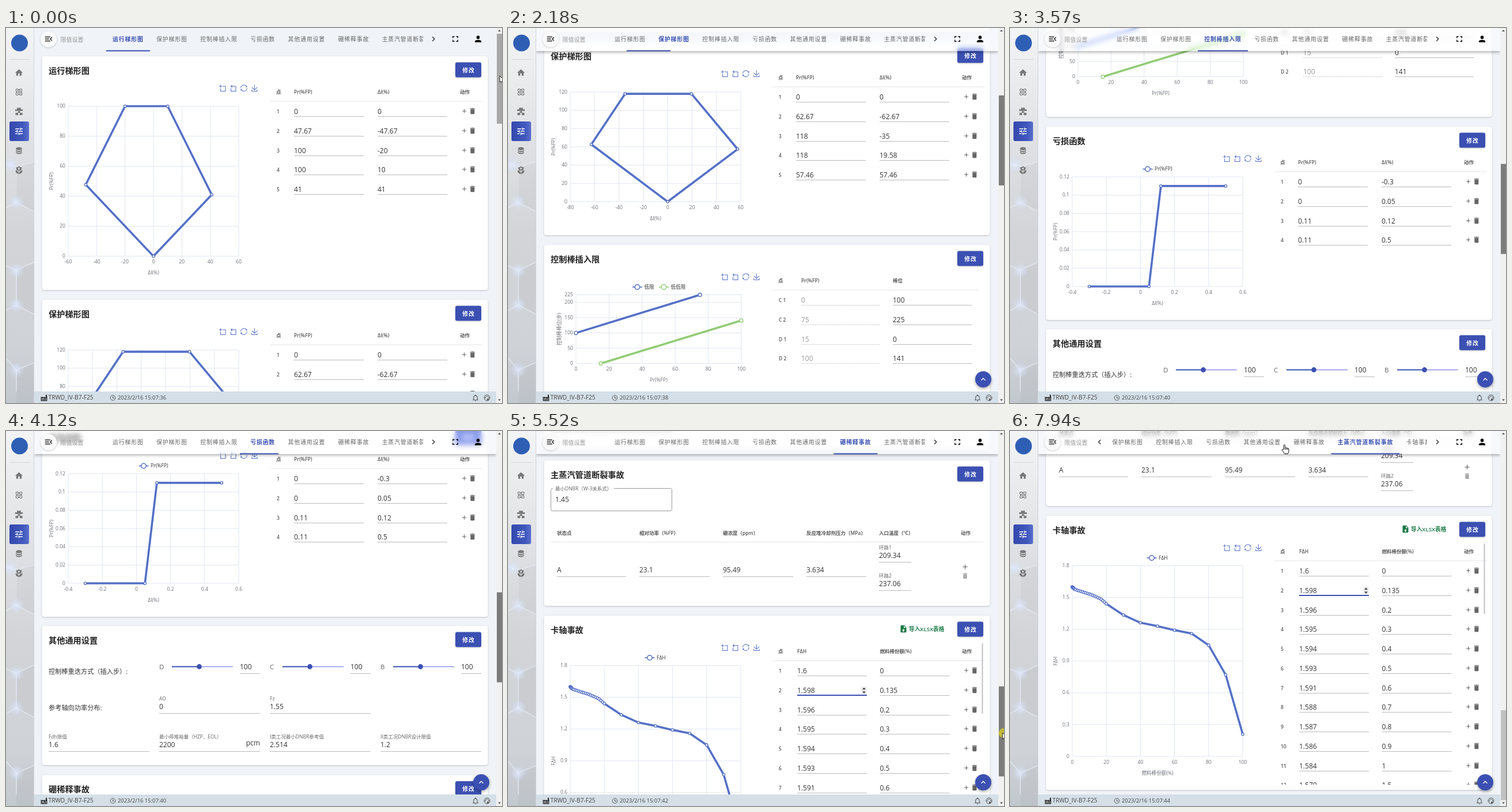
Write an HTML page that moves like this. It is 861 by 650 pixels and loops after 7.99 s.

```html
<!DOCTYPE html>
<html lang="zh-CN">
<head>
<meta charset="utf-8">
<style>
html, body { margin: 0; width: 100%; height: 100%; overflow: hidden; background: #f0f3f8; }
body { position: relative; font-family: 'Open Sans', 'Noto Sans CJK SC', 'Noto Sans CJK', sans-serif; }
svg, #bar { position: absolute; left: 0; top: 0; }
#bar { left: 49px; width: 802px; height: 40px; }
#bar.up { background: rgba(255,255,255,.42); backdrop-filter: blur(5px) saturate(1.5); box-shadow: 0 2px 5px rgba(0,0,0,.32); }
text { white-space: pre; }
.card { filter: drop-shadow(0 1px 1.5px rgba(0,0,0,.2)); }
.float { filter: drop-shadow(0 2px 2.5px rgba(0,0,0,.35)); }
</style>
</head>
<body>
<svg id="page" width="861" height="2660"></svg>
<div id="bar"></div>
<svg id="chrome" width="861" height="650"></svg>
<script>
const BLUE = '#3b50b2', LINE = '#5470c6', GREEN = '#91cc75', GREY = '#6e7079', RULE = '#b9bbbf';
const $ = id => document.getElementById(id);

const icons = {
  home: 'M10 20v-6h4v6h5v-8h3L12 3 2 12h3v8z',
  data: 'M12 3C7.6 3 4 4.8 4 7s3.6 4 8 4 8-1.8 8-4-3.6-4-8-4M4 9v3c0 2.2 3.6 4 8 4s8-1.8 8-4V9c0 2.2-3.6 4-8 4s-8-1.8-8-4m0 5v3c0 2.2 3.6 4 8 4s8-1.8 8-4v-3c0 2.2-3.6 4-8 4s-8-1.8-8-4z',
  tune: 'M3 17v2h6v-2H3M3 5v2h10V5H3m10 16v-2h8v-2h-8v-2h-2v6h2M7 9v2H3v2h4v2h2V9H7m14 4v-2H11v2h10m-6-4h2V7h4V5h-4V3h-2v6z',
  desks: 'M7 2h10v4h5v4H2V6h5zM9 11h6v4H9zM3 15h7v6H3zM14 15h7v6h-7z',
  flower: 'M12 2l3 3h4v4l-2 4-5 1-5-1-2-4V5h4zM12 6a2.5 2.5 0 1 0 0 5 2.5 2.5 0 0 0 0-5M3 13c5 0 8 3 9 8 1-5 4-8 9-8 0 6-4 9-9 9s-9-3-9-9z',
  user: 'M12 4a4 4 0 1 1 0 8 4 4 0 0 1 0-8m0 10c4.4 0 8 1.8 8 4v2H4v-2c0-2.2 3.6-4 8-4z',
  full: 'M5 5h5v2H7v3H5V5m9 0h5v5h-2V7h-3V5m3 9h2v5h-5v-2h3v-3m-7 3v2H5v-5h2v3h3z',
  bin: 'M19 4h-3.5l-1-1h-5l-1 1H5v2h14M6 19a2 2 0 0 0 2 2h8a2 2 0 0 0 2-2V7H6z',
  plus: 'M19 13h-6v6h-2v-6H5v-2h6V5h2v6h6z',
  bell: 'M10 21h4c0 1.1-.9 2-2 2s-2-.9-2-2m11-2v1H3v-1l2-2v-6c0-3.1 2-5.8 5-6.7V4a2 2 0 0 1 4 0v.3c3 .9 5 3.6 5 6.7v6l2 2m-4-8a5 5 0 0 0-10 0v7h10z',
  menu: 'M21 15.6L19.6 17l-5-5 5-5L21 8.4 17.4 12zM3 6h13v2H3V6m0 7v-2h10v2H3m0 5v-2h13v2H3z',
  up: 'M7.4 15.4L12 10.8l4.6 4.6L18 14l-6-6-6 6z',
  right: 'M8.6 16.6L13.2 12 8.6 7.4 10 6l6 6-6 6z',
  left: 'M15.4 16.6L10.8 12l4.6-4.6L14 6l-6 6 6 6z',
  file: 'M14 2H6a2 2 0 0 0-2 2v16a2 2 0 0 0 2 2h12a2 2 0 0 0 2-2V8l-6-6m-1 7V3.5L18.5 9H13m-1 3l4 4h-2.5v4h-3v-4H8z',
  plant: 'M4 18v2h4v-2H4m0-4v2h10v-2H4m6 4v2h4v-2h-4m6-4v2h4v-2h-4m0 4v2h4v-2h-4M2 22V8l5 4V8l5 4V8l5 4 1-10h3l1 10v10z'
};
const tools = [
  'M0,13.5h26.9M13.5,26.9V0M32.1,13.5H58V58H13.5V32.1',
  'M22,1.4L9.9,13.5l12.3,12.3M10.3,13.5H54.9v44.6H10.3v-26',
  'M47,18.9h9.8V8.7M56.3,20.1C52.1,9,40.5,.6,26.8,2.1C12.6,3.7,1.6,16.2,2.1,30.6M13,41.1H3.1v10.2M3.7,39.9c4.2,11.1,15.8,19.5,29.5,18c14.2-1.6,25.2-14.1,24.7-28.5',
  'M4.7,22.9L29.3,45.5L54.7,23.4M4.6,43.6V58H53.8V43.6M29.2,45.1V0'
];

// Drawing helpers; text is centred vertically on y
const text = (x, y, s, size = 12, fill = '#333', more = '') =>
  `<text x="${x}" y="${y + size * .36}" font-size="${size}" fill="${fill}" ${more}>${s}</text>`;
const bold = 'font-weight="600"', mid = 'text-anchor="middle"';
const small = (x, y, s) => text(x, y, s, 8.5, '#666');
const head = (x, y, s) => text(x, y, s, 8.5, '#555', bold);
const line = (x1, y1, x2, y2, c = RULE, w = 1, more = '') =>
  `<path d="M${x1} ${y1}L${x2} ${y2}" stroke="${c}" stroke-width="${w}" ${more}/>`;
const rect = (x, y, w, h, fill, more = '') =>
  `<rect x="${x}" y="${y}" width="${w}" height="${h}" fill="${fill}" ${more}/>`;
const dot = (x, y, r, fill, more = '') => `<circle cx="${x}" cy="${y}" r="${r}" fill="${fill}" ${more}/>`;
const icon = (k, x, y, size, fill = '#666') =>
  `<path fill-rule="evenodd" fill="${fill}" d="${icons[k]}" transform="translate(${x - size / 2} ${y - size / 2}) scale(${size / 24})"/>`;
const range = (a, b, step) =>
  Array.from({ length: Math.round((b - a) / step) + 1 }, (_, i) => +(a + i * step).toFixed(2));
const mix = (a, b, p) => a + (b - a) * p;
const clamp = v => Math.max(0, Math.min(1, v));

function track(keys, t, col = 1) {
  const i = keys.findIndex(k => k[0] > t);
  if (i < 0) return keys[keys.length - 1][col];
  if (!i) return keys[0][col];
  const a = keys[i - 1], b = keys[i];
  return mix(a[col], b[col], (t - a[0]) / (b[0] - a[0]));
}

function chart({ x0 = 108, x1 = 404, y0 = 87, y1 = 277, xs, ys, xn, yn, series, legend = [], r = 2.2 }) {
  const xa = xs[0], xb = xs[xs.length - 1], ya = ys[0], yb = ys[ys.length - 1];
  const X = v => mix(x0, x1, (v - xa) / (xb - xa)), Y = v => mix(y1, y0, (v - ya) / (yb - ya));
  let s = '';
  for (const v of xs) s += line(X(v), y0, X(v), y1, '#e0e6f1') + text(X(v), y1 + 9.5, v, 8.6, GREY, mid);
  for (const v of ys) s += line(x0, Y(v), x1, Y(v), '#e0e6f1') + text(x0 - 5, Y(v) - .5, v, 8.6, GREY, 'text-anchor="end"');
  s += text((x0 + x1) / 2, y1 + 28.5, xn, 8.6, GREY, mid);
  s += `<g transform="translate(${x0 - 29} ${(y0 + y1) / 2}) rotate(-90)">${text(0, 0, yn, 8.6, GREY, mid)}</g>`;
  series.forEach(([c, pts, end = '']) => {
    s += `<path d="M${pts.map(p => X(p[0]) + ' ' + Y(p[1])).join('L')}${end}" fill="none" stroke="${c}" stroke-width="3.6" stroke-linejoin="round"/>`;
    for (const p of pts) s += dot(X(p[0]), Y(p[1]), r, '#fff', `stroke="${c}" stroke-width="1.3"`);
  });
  legend.forEach(([x, name, c]) => {
    s += line(x, y0 - 13.5, x + 17, y0 - 13.5, c, 1.6) + dot(x + 8.5, y0 - 13.5, 4.2, '#fff', `stroke="${c}" stroke-width="1.5"`);
    s += text(x + 20.5, y0 - 14, name, 8.6, '#333');
  });
  tools.forEach((d, i) => s += `<path d="${d}" transform="translate(${370 + i * 18.6} 49.5) scale(.19)" fill="none" stroke="${LINE}" stroke-width="5.4"/>`);
  return s;
}

const rowY = i => 96 + Math.round(i * 33.75);
const actions = (x, y) => icon('plus', x, y, 12) + icon('bin', x + 14.3, y, 14);

function table(heads, rows, { cols = [500, 645], w = 121, acts = true, end = 828 } = {}) {
  let s = head(469, 62, '点') + cols.map((x, i) => head(x, 62, heads[i])).join('') + line(459, 78, end, 78, '#e1e4e9');
  if (acts) s += head(788, 62, '动作');
  rows.forEach((row, i) => {
    const y = rowY(i), [name, ...vals] = acts ? [i + 1, ...row] : row;
    s += head(470, y, name);
    vals.forEach((v, j) => {
      const off = !acts && !j;
      s += text(cols[j], y, v, 12, off ? '#999' : '#333');
      s += line(cols[j], y + 8.5, cols[j] + w, y + 8.5, RULE, 1, off ? 'stroke-dasharray="1.5 1.5"' : '');
    });
    if (acts) s += actions(795.5, y - 1);
  });
  return s;
}

const field = (x, y, w, label, value) =>
  small(x, y, label) + text(x, y + 14.5, value) + line(x, y + 26, x + w, y + 26);
const outlined = (label, gap, value) =>
  rect(74.5, 48.5, 210, 39, 'none', 'rx="3" stroke="#999"') + rect(78, 46, gap, 5, '#fff') +
  small(82, 49, label) + text(82, 67.5, value);

function general() {
  let s = text(74, 78.5, '控制棒重迭方式（插入步）:', 11.2) + text(74, 142, '参考轴向功率分布:', 11.2);
  ['D', 'C', 'B'].forEach((n, i) => {
    const x = 266 + i * 192;
    s += text(x, 70.5, n, 11.5, '#666') + line(x + 69, 70.5, x + 128, 70.5, '#8f92ee', 1.3) +
      line(x + 22, 70.5, x + 70, 70.5, BLUE, 2) + dot(x + 69.5, 70.5, 4.4, BLUE) +
      text(x + 140, 70.5, 100) + line(x + 140, 82.5, x + 175, 82.5);
  });
  return s + field(266, 125.5, 175, 'AO', 0) + field(458, 125.5, 175, 'Fz', 1.55) +
    field(74, 191.5, 175, 'Fdh限值', 1.6) + field(266, 191.5, 175, '最小停堆裕量（HZP、EOL）', 2200) +
    field(458, 191.5, 175, 'I类工况最小DNBR参考值', 2.514) + field(650, 191.5, 175, 'II类工况DNBR设计限值', 1.2) +
    text(441, 203, 'pcm', 12, '#333', 'text-anchor="end"');
}

function steam() {
  const heads = [[85, '状态点'], [228, '相对功率（%FP）'], [373, '硼浓度（ppm）'], [518, '反应堆冷却剂压力（MPa）'], [644, '入口温度（℃）'], [786, '动作']];
  const cells = [[85, 'A', 120], [228, 23.1, 122], [373, 95.49, 122], [518, 3.634, 104]];
  return outlined('最小DNBR（W-3关系式）', 106, 1.45) + heads.map(h => head(h[0], 126, h[1])).join('') +
    line(74, 141.5, 825, 141.5, '#e1e4e9') +
    cells.map(([x, v, w]) => text(x, 189.5, v) + line(x, 201.5, x + w, 201.5)).join('') +
    field(644, 150.5, 56, '环路1', 209.34) + field(644, 199.5, 56, '环路2', 237.06) +
    icon('plus', 793.5, 184.5, 14) + icon('bin', 793.5, 200, 13, '#aaa');
}

function rotor() {
  const share = [0, .135, ...range(.2, 1, .1), 1.5];
  const peak = [1.6, 1.598, 1.596, 1.595, 1.594, 1.593, 1.591, 1.588, 1.587, 1.586, 1.584, 1.579];
  const bend = [[2, 1.574], [11, 1.528], [15, 1.5], [17, 1.484], [20, 1.441]];
  const tail = [1.335, 1.262, 1.23, 1.192, 1.16, 1.05, .77, .21];
  const pts = [...share.map((x, i) => [x, peak[i]]), ...range(2, 20, 1).map(x => [x, track(bend, x)]),
    ...tail.map((y, i) => [30 + i * 10, y])];
  return icon('file', 686.5, 23, 15, '#1c7a48') + text(696, 24, '导入XLSX表格', 9.7, '#1c7a48', bold) +
    chart({ y0: 86.5, y1: 417, xs: range(0, 100, 20), ys: range(0, 1.8, .3), xn: '燃料棒份额(%)', yn: 'FΔH',
      series: [[LINE, pts]], legend: [[237.5, 'FΔH', LINE]] }) +
    '<clipPath id="rows"><path d="M450 45H836V466H450z"/></clipPath><g clip-path="url(#rows)">' +
    table(['FΔH', '燃料棒份额(%)'], share.map((x, i) => [peak[i], x]), { cols: [502, 645.5] }) + '</g>' +
    line(502, 138, 623, 138, BLUE, 2) + rect(613, 123, 10, 13, '#eee') +
    '<path d="M615 128l3-3.5 3 3.5zM615 131.5l3 3.5 3-3.5z" fill="#444"/>' +
    '<path id="caret" d="M531.5 123V136" stroke="#222"/>' +
    line(823.5, 48, 823.5, 170, '#bfc1c5', 2);
}

const shape = ['Pr(%FP)', 'ΔI(%)'];
const flip = rows => rows.map(p => [p[1], p[0]]);
const runRows = [[0, 0], [47.67, -47.67], [100, -20], [100, 10], [41, 41]];
const guardRows = [[0, 0], [62.67, -62.67], [118, -35], [118, 19.58], [57.46, 57.46]];
const lossRows = [[0, -.3], [0, .05], [.11, .12], [.11, .5]];
const axes = { xn: 'ΔI(%)', yn: 'Pr(%FP)' };

// name, top, height, body
const cards = [
  ['运行梯形图', 49, 405, () => chart({ ...axes, y0: 86.5, y1: 346.5, xs: range(-60, 60, 20), ys: range(0, 100, 20),
    series: [[LINE, flip(runRows), 'Z']] }) + table(shape, runRows)],
  ['保护梯形图', 471, 335, () => chart({ ...axes, xs: range(-80, 60, 20), ys: range(0, 120, 20),
    series: [[LINE, flip(guardRows), 'Z']] }) + table(shape, guardRows)],
  ['控制棒插入限', 823, 275, () => chart({ x0: 118, x1: 405, y0: 86.5, y1: 205.5, xs: range(0, 100, 20), ys: [0, 50, 100, 150, 200, 225],
    xn: 'Pr(%FP)', yn: '控制棒棒位(步)', r: 3, series: [[LINE, [[0, 100], [75, 225]]], [GREEN, [[15, 0], [100, 141]]]],
    legend: [[216, '低限', LINE], [262, '低低限', GREEN]] }) +
    table(['Pr(%FP)', '棒位'], [['C 1', 0, 100], ['C 2', 75, 225], ['D 1', 15, 0], ['D 2', 100, 141]],
      { cols: [509, 668], w: 137, acts: false, end: 816 })],
  ['亏损函数', 1115, 335, () => chart({ ...axes, xs: range(-.4, .6, .2), ys: range(0, .12, .02),
    series: [[LINE, flip(lossRows)]], legend: [[230.5, 'Pr(%FP)', LINE]] }) + table(shape, lossRows)],
  ['其他通用设置', 1466, 241, general],
  ['硼稀释事故', 1724.5, 119.5, () => outlined('换料停堆最小停堆硼浓度', 100, 2300) + text(276, 65.5, 'ppm', 12, '#333', 'text-anchor="end"')],
  ['主蒸汽管道断裂事故', 1861, 252, steam],
  ['卡轴事故', 2130, 475, rotor]
];

$('page').innerHTML = cards.map(([name, top, h, body]) =>
  `<g transform="translate(0 ${top})">` + rect(62.5, 0, 774, h, '#fff', 'rx="4" class="card"') +
  text(74, 24.5, name, 14.2, '#222', bold) +
  rect(780, 10.5, 45, 26, BLUE, 'rx="3" class="card"') +
  text(802.9, 24, '修改', 9.9, '#fff', `${bold} ${mid} letter-spacing=".8"`) + body() + '</g>').join('');

// Tabs
const PITCH = 10.75;
let at = 185;
const tabs = cards.map(([name]) => {
  const tab = { name, x: at, a: at - 11.2, b: at + name.length * PITCH + 11.2 };
  at = tab.b + 11.2;
  return tab;
});

function sidebar() {
  const hex = 'M0 235L20 240 48 232M0 312L18 302 48 318M0 412L18 420 48 406M18 420V480M0 490L18 480 48 496M0 572L18 593 48 580M18 593V630';
  const facets = 'M20 240L48 232V318L18 302zM18 420L48 406V496L18 480zM18 593L48 580V650H18z';
  const side = [['home', 77.5], ['desks', 145], ['data', 212.5], ['flower', 246]];
  const ring = a => `<ellipse cx="22.5" cy="111" rx="6.8" ry="3" fill="none" stroke="#777" stroke-width="1.3" transform="rotate(${a} 22.5 111)"/>`;
  const stops = [[0, '#f3f4f5'], [.3, '#dfe1e4'], [.55, '#d2d4d7'], [.85, '#cfd2d7'], [1, '#c3c8cf']];
  const lights = [[8, 237], [18, 302], [18, 420], [18, 480], [18, 593]];
  return `<defs><linearGradient id="side" x2="0" y2="1">${stops.map(([o, c]) => `<stop offset="${o}" stop-color="${c}"/>`).join('')}</linearGradient>
    <linearGradient id="on"><stop stop-color="#3448ac"/><stop offset=".7" stop-color="#4058be"/><stop offset="1" stop-color="#5a70cc"/></linearGradient>
    <radialGradient id="glow"><stop stop-color="#e3ecff"/><stop offset="1" stop-color="#d5e3ff" stop-opacity="0"/></radialGradient>
    <clipPath id="edge"><path d="M0 0H48V650H0z"/></clipPath></defs>` +
    rect(0, 0, 48.5, 650, 'url(#side)') +
    `<g clip-path="url(#edge)"><path d="${facets}" fill="#000" opacity=".03"/>
     <path d="${hex}" fill="none" stroke="#e6ebf5" stroke-width="1.8" opacity=".75"/>` +
    lights.map(([x, y]) => dot(x, y, 14, 'url(#glow)', 'opacity=".8"')).join('') + '</g>' +
    line(48.5, 0, 48.5, 650, '#d0d4da') + dot(23.5, 26, 14.5, '#2f5fb5') + line(6, 54.5, 41, 54.5, '#d3d5d9') +
    side.map(([k, y]) => icon(k, 22.5, y, 16, '#777')).join('') + ring(45) + ring(-45) + dot(22.5, 111, 1.3, '#777') +
    rect(6, 162, 34, 34, 'url(#on)', 'rx="3"') + icon('tune', 22.5, 179, 17, '#fff');
}

$('chrome').innerHTML = sidebar() +
  dot(74, 19.5, 14, '#fafafa', 'class="card"') + icon('menu', 74, 19, 17, '#222') + text(94.5, 20, '限值设置', 10, '#999') +
  '<clipPath id="strip"><path d="M166 0H724V41H166z"/></clipPath><g clip-path="url(#strip)"><g id="tabs">' +
  tabs.map(tab => text(tab.x, 19.5, tab.name, 9.9, '#666', `class="tab" letter-spacing="${PITCH - 9.9}"`)).join('') +
  rect(0, 38.5, 1, 2, BLUE, 'id="mark"') + '</g></g>' +
  `<g id="back">${icon('left', 155.5, 19, 17, '#333')}</g>` + icon('right', 742, 19, 17, '#333') +
  icon('full', 780, 19, 17, '#111') + icon('user', 819.5, 19, 17, '#111') +
  rect(49, 630, 802, 20, '#d4dfe7') + icon('plant', 66, 641, 13, '#222') + text(73.5, 640.5, 'TRWD_IV-B7-F25', 10.2, '#444') +
  dot(185.5, 641, 4.3, 'none', 'stroke="#555"') + '<path d="M185.5 638.5V641.5H188" fill="none" stroke="#555"/>' +
  text(194, 640.5, '', 9.4, '#444', 'id="clock"') + icon('bell', 815, 641, 13, '#555') +
  dot(835, 641, 5, 'none', 'stroke="#555"') + [[832, 641], [833.5, 638.6], [836.5, 638.6], [838, 641]].map(p => dot(...p, .9, '#555')).join('') +
  dot(836.5, 644, 1.8, '#555') +
  `<g id="fab">${dot(0, 0, 14, BLUE, 'class="float"')}${icon('up', 0, 0, 16, '#fff')}</g>` +
  rect(851, 0, 10, 650, '#f1f1f1') + '<path d="M854 6l2.5-3 2.5 3zM854 643.5l2.5 3 2.5-3z" fill="#555"/>' +
  rect(852, 10, 9, 156, '#aaa', 'id="thumb"') +
  `<g id="cursor">${dot(2, 1, 8.5, '#d8d020', 'id="press" opacity=".75"')}
   <path id="arrow" d="M0 0V14l3.3-3 2.2 5 2.2-1-2.2-4.8H10z" transform="scale(.8)" fill="#fff" stroke="#000"/>
   <path id="hand" d="M4 9V1.5q1.2-1.6 2.4 0V6q1.3-.8 2.3.4 1.3-.6 2.2.5 1.5-.4 2 .9V12q-.3 2-1.5 4.5H5.5Q3.5 12.5.8 10 .8 8.2 4 9zM6.4 6V9.5M8.7 6.5V9.5M10.9 7V9.5"
    transform="translate(-5 -1)" fill="#fff" stroke="#111"/></g>`;

// Motion
const LOOP = 7990, MAX = 1983;
const scrollKeys = [[600, 0], [1260, 112], [3010, 757], [4120, 1128], [4890, 1524], [5900, MAX]];
const mouseKeys = [[560, 857, 83], [1260, 859, 112], [1700, 874, 155], [3010, 874, 266], [4120, 874, 354], [4890, 859, 453],
  [5900, 858, 565], [6220, 857, 571], [6560, 857, 571], [7380, 640, 130], [7880, 476, 24]];

const steps = [{ t: -1000, i: 0 }];
let fabAt = LOOP;
for (let t = 0; t < LOOP; t += 10) {
  const s = track(scrollKeys, t), last = steps[steps.length - 1].i;
  if (last < 6 && cards[last + 1][1] - s < 45) steps.push({ t, i: last + 1 });
  if (s > 300) fabAt = Math.min(fabAt, t);
}
const labels = document.querySelectorAll('.tab');
const show = (id, on) => $(id).style.display = on ? '' : 'none';

function draw(now) {
  const shift = now < 3980 ? 0 : 60;
  const t = Math.floor((now - shift) / 70) * 70 + shift;
  const s = Math.round(track(scrollKeys, t));
  $('page').style.transform = `translateY(${-s}px)`;
  $('bar').className = s ? 'up' : '';

  const k = steps.filter(e => e.t <= t).length - 1, cur = steps[k], prev = steps[Math.max(0, k - 1)];
  const p = 1 - (1 - clamp((t - cur.t) / 300)) ** 3, to = tabs[cur.i], from = tabs[prev.i];
  const a = mix(from.a, to.a, p);
  $('mark').setAttribute('x', a);
  $('mark').setAttribute('width', mix(from.b, to.b, p) - a);
  $('tabs').setAttribute('transform', `translate(${cur.i > 5 ? -84 * p : 0} 0)`);
  labels.forEach((el, i) => {
    el.setAttribute('fill', i === cur.i ? BLUE : '#666');
    el.setAttribute('font-weight', i === cur.i ? 600 : 400);
  });
  show('back', cur.i > 5);

  $('fab').setAttribute('transform', `translate(825 609) scale(${clamp((t - fabAt) / 200)})`);
  $('clock').textContent = '2023/2/16 15:07:' + (37 + Math.floor((now - 440) / 1000));
  show('caret', now % 1000 < 500);

  const drag = t >= 560 && t < 6450;
  $('thumb').setAttribute('y', 10 + s / MAX * 474);
  $('thumb').setAttribute('fill', drag ? '#7c7c7c' : t < 6650 ? '#a8a8a8' : '#c1c1c1');
  const y = track(mouseKeys, t, 2);
  $('cursor').setAttribute('transform', `translate(${track(mouseKeys, t)} ${y})`);
  show('press', drag);
  show('arrow', y >= 40);
  show('hand', y < 40);
}

let start;
function tick(time) {
  start ??= time;
  draw((time - start) % LOOP);
  requestAnimationFrame(tick);
}
draw(0);
requestAnimationFrame(tick);
</script>
</body>
</html>
```
